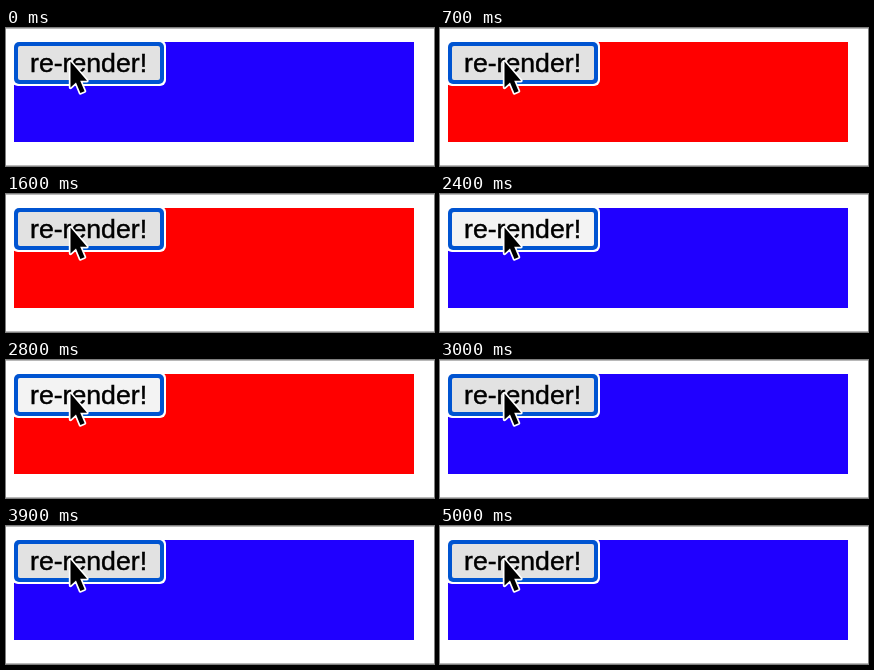
Recreate the animation shown at these times as an HTML page. Size 428 by 138 pixels, loop 6100 ms.

```html
<!DOCTYPE html>
<html lang="en">
<head>
<meta charset="utf-8">
<title>re-render</title>
<style>
html, body { margin: 0; width: 100%; height: 100%; overflow: hidden; background: #fff; }
svg { display: block; width: 428px; height: 138px; }
text { font: 26.667px "Liberation Sans", Arial, sans-serif; fill: #000; stroke: #000; stroke-width: .45; }
.rule { fill: #b8b8b8; }
.panel { fill: #2000ff; }
.panel.red { fill: #f00; }
.face { fill: #e2e2e2; }
.face.down { fill: #f3f3f3; }
.ring { fill: #0054d1; }
.halo { fill: #fff; }
.cursor { fill: #000; stroke: #fff; stroke-width: 3.4; stroke-linejoin: round; paint-order: stroke; }
</style>
</head>
<body>
<svg viewBox="0 0 428 138">
  <rect class="rule" width="428" height="1"/>
  <rect class="rule" y="137" width="428" height="1"/>
  <rect class="panel" x="8" y="14" width="400" height="100"/>
  <rect class="halo" x="6" y="12" width="154" height="46" rx="6"/>
  <rect class="ring" x="8" y="14" width="150" height="42" rx="5"/>
  <rect class="face" x="12" y="18" width="142" height="34" rx="2"/>
  <text x="24" y="44">re-render!</text>
  <path class="cursor" d="M64.5 33.5V59.5L70 54.4L74.4 65L78.6 63.2L74.2 52.8H81Z"/>
</svg>
<script>
const LOOP = 6100;
const HOLD = 100;
const clicks = [700, 1100, 1600, 2000, 2500, 2900, 3300, 3600]; // release times, ms
const panel = document.querySelector('.panel');
const face = document.querySelector('.face');

// Every release flips the panel; the face is light while the button is held.
function draw(now) {
  const t = now % LOOP;
  const done = clicks.filter(c => c <= t).length;
  panel.classList.toggle('red', done % 2 === 1);
  face.classList.toggle('down', clicks.some(c => t >= c - HOLD && t < c));
  requestAnimationFrame(draw);
}
draw(performance.now());
</script>
</body>
</html>
```
